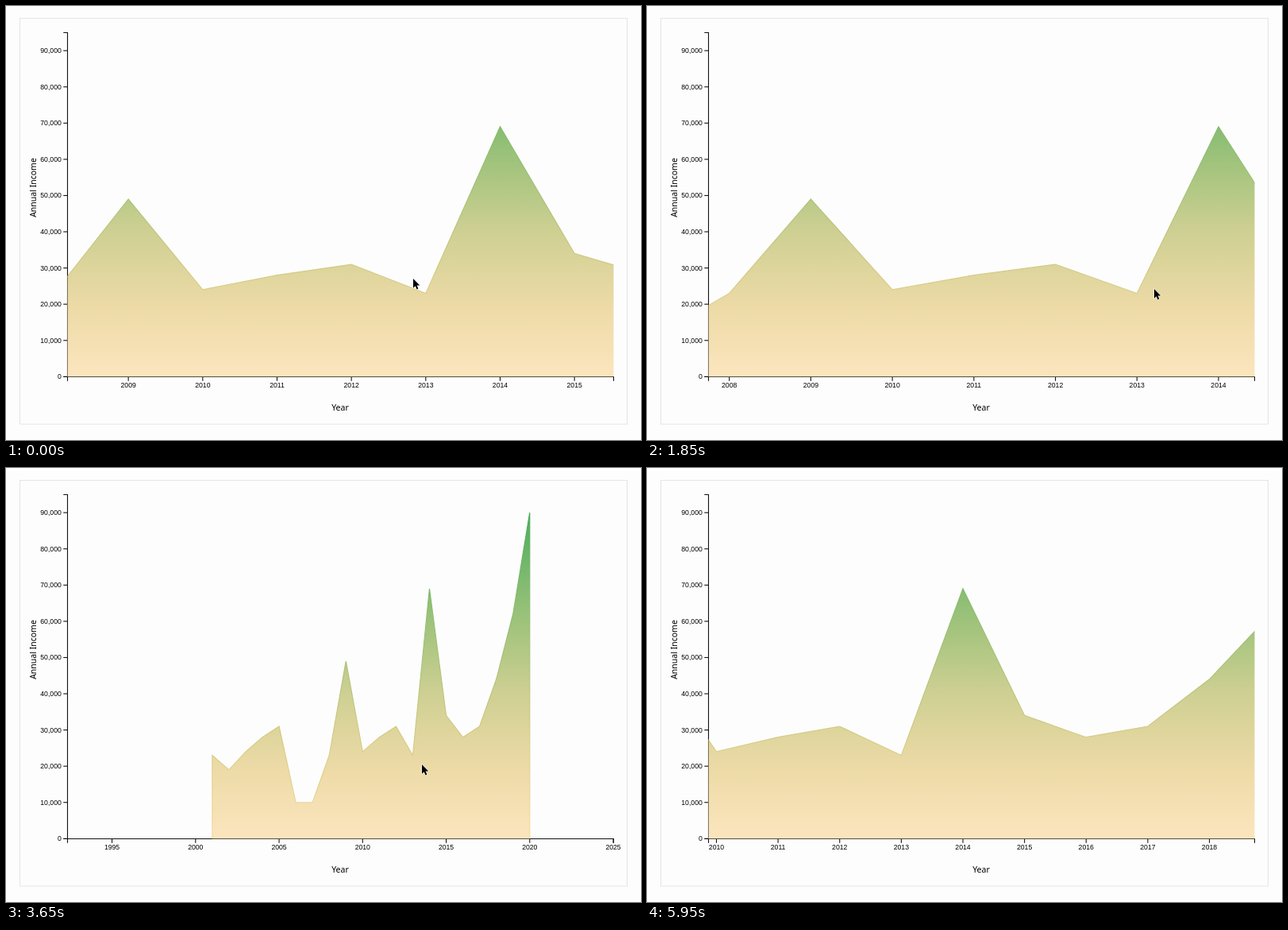
Recreate the animation shown at these times as an HTML page. Size 800 px wide and 546 px high, loop 6 s.

```html
<!DOCTYPE html>
<html lang="en">
<head>
<meta charset="utf-8">
<title>Annual income by year</title>
<style>
html, body { margin: 0; width: 100%; height: 100%; overflow: hidden; background: #fefdfe; }
svg { display: block; }
.axis { fill: none; stroke: #111; stroke-width: 1.1; }
.tick { font: 8.7px "Liberation Sans", Arial, sans-serif; fill: #000; }
.title { font: 10.5px "Noto Sans", sans-serif; fill: #000; text-anchor: middle; }
</style>
</head>
<body>
<svg width="800" height="546" viewBox="0 0 800 546">
  <defs>
    <linearGradient id="fill" gradientUnits="userSpaceOnUse" x1="0" y1="466" x2="0" y2="56">
      <stop offset="0" stop-color="#fce5be"/>
      <stop offset=".22" stop-color="#ecdaa6"/>
      <stop offset=".44" stop-color="#cfd093"/>
      <stop offset=".66" stop-color="#a0c37c"/>
      <stop offset="1" stop-color="#4cad5c"/>
    </linearGradient>
    <linearGradient id="edge" gradientUnits="userSpaceOnUse" x1="0" y1="466" x2="0" y2="56">
      <stop offset="0" stop-color="#f6dc9c"/>
      <stop offset=".33" stop-color="#d2ca83"/>
      <stop offset=".75" stop-color="#84bb6c"/>
      <stop offset="1" stop-color="#45a957"/>
    </linearGradient>
    <clipPath id="plot"><rect x="77.5" y="33" width="688" height="433.3"/></clipPath>
  </defs>
  <rect x="17.5" y="15.5" width="765" height="510.5" fill="none" stroke="#e3e6e1"/>
  <path class="axis" d="M72.3 33.5H77.5V466.5H72.3M77.5 471.7V466.5H765.5V471.7"/>
  <g id="yAxis"></g>
  <g id="xAxis"></g>
  <path id="area" clip-path="url(#plot)" fill="url(#fill)" stroke="url(#edge)" stroke-width="1.2"/>
  <text class="title" x="421" y="508.7">Year</text>
  <text class="title" transform="translate(37.6 228.5) rotate(-90)">Annual Income</text>
  <path id="cursor" d="M0 0V11.7L2.7 9.2L4.5 13.4L6.4 12.6L4.6 8.5H8.3Z" fill="#000" stroke="#fff" stroke-width="1.1" paint-order="stroke"/>
</svg>
<script>
const LOOP = 6000, STEP = 50, LEFT = 77.5, RIGHT = 765.5, BASE = 466.3;
const FIRST = 2001, ANCHOR = 2014;
const income = [23, 19, 24, 28, 31, 10, 10, 23, 49, 24, 28, 31, 23, 69, 34, 28, 31, 44, 62, 90];

const linear = u => u;
const easeIn = u => u * u;
const easeOut = u => u * (2 - u);
const smooth = u => u * u * (3 - 2 * u);

// time, pointer x, pointer y, x of the anchor year, pixels per year, easing towards this pose
const NEAR = 102.72, FAR = 21.05;
const poses = [
  [0, 513, 343, 622.5, 93.67, linear],
  [350, 513, 343, 627.4, NEAR, linear],
  [500, 471, 350, 627.4, NEAR, smooth],
  [850, 296, 356, 452.5, NEAR, smooth],
  [950, 275, 357, 431.5, NEAR, easeOut],
  [1000, 275, 357, 431.5, NEAR, linear],
  [1450, 563.5, 356, 720, NEAR, smooth],
  [1700, 638, 356, 720, NEAR, smooth],
  [1800, 638, 356, 720, NEAR, linear],
  [1850, 639, 356, 720, NEAR, linear],
  [2250, 55, 358, 136, NEAR, smooth],
  [2400, 55, 358, 136, NEAR, linear],
  [2450, 71, 358, 152, NEAR, easeIn],
  [2650, 315, 357, 396.3, NEAR, smooth],
  [2770, 643, 357, 396.3, NEAR, smooth],
  [2900, 643, 357, 590.8, 37.47, linear],
  [3020, 643, 357, 639.7, FAR, easeOut],
  [3050, 643, 357, 639.7, FAR, linear],
  [3100, 622, 358, 618.7, FAR, easeIn],
  [3300, 537, 368, 533.5, FAR, easeOut],
  [3450, 524, 373, 533.5, FAR, smooth],
  [3780, 524, 373, 533.5, FAR, linear],
  [4250, 524, 373, 424, 66.8, linear],
  [4550, 524, 373, 398, 77.63, easeOut],
  [4600, 524, 373, 398, 77.63, linear],
  [4950, 815, 335, 398, 77.63, easeIn],
  [LOOP, 815, 335, 398, 77.63, linear]
];

const el = id => document.getElementById(id);
const mix = (a, b, u) => a + (b - a) * u;
const yOf = thousands => BASE - thousands * 4.557;

function poseAt(t) {
  const i = poses.findIndex(p => p[0] > t);
  const [t0, mx0, my0, x0, k0] = poses[i - 1];
  const [t1, mx1, my1, x1, k1, ease] = poses[i];
  const u = ease((t - t0) / (t1 - t0));
  const k = k0 * (k1 / k0) ** u;
  // while zooming, the anchor moves in proportion to the scale
  const v = k1 === k0 ? u : (k - k0) / (k1 - k0);
  return { mx: mix(mx0, mx1, u), my: mix(my0, my1, u), x: mix(x0, x1, v), k };
}

function tickStep(k) {
  const target = (RIGHT - LEFT) / k / 10;
  return target >= Math.sqrt(10) ? 5 : target >= Math.SQRT2 ? 2 : 1;
}

function draw(t) {
  const { mx, my, x, k } = poseAt(t);
  const xOf = year => x + (year - ANCHOR) * k;

  const points = income.map((v, i) => `${xOf(FIRST + i)} ${yOf(v)}`);
  const last = FIRST + income.length - 1;
  el("area").setAttribute("d", `M${points.join("L")}L${xOf(last)} ${BASE}H${xOf(FIRST)}Z`);

  const step = tickStep(k);
  let ticks = "";
  for (let year = 1980; year <= 2030; year += step) {
    const px = xOf(year);
    if (px < LEFT || px > RIGHT) continue;
    ticks += `<path class="axis" d="M${px} 466.5V471.7"/>
      <text class="tick" x="${px}" y="480" text-anchor="middle">${year}</text>`;
  }
  el("xAxis").innerHTML = ticks;
  el("cursor").setAttribute("transform", `translate(${mx} ${my})`);
}

for (let v = 0; v <= 90; v += 10) {
  const y = yOf(v), label = v ? v + ",000" : "0";
  el("yAxis").innerHTML += `<path class="axis" d="M72.3 ${y}H77.5"/>
    <text class="tick" x="69.8" y="${y + 3}" text-anchor="end">${label}</text>`;
}

const start = performance.now();
function frame() {
  const t = (performance.now() - start) % LOOP;
  draw(Math.floor(t / STEP) * STEP);
  requestAnimationFrame(frame);
}
frame();
</script>
</body>
</html>
```
